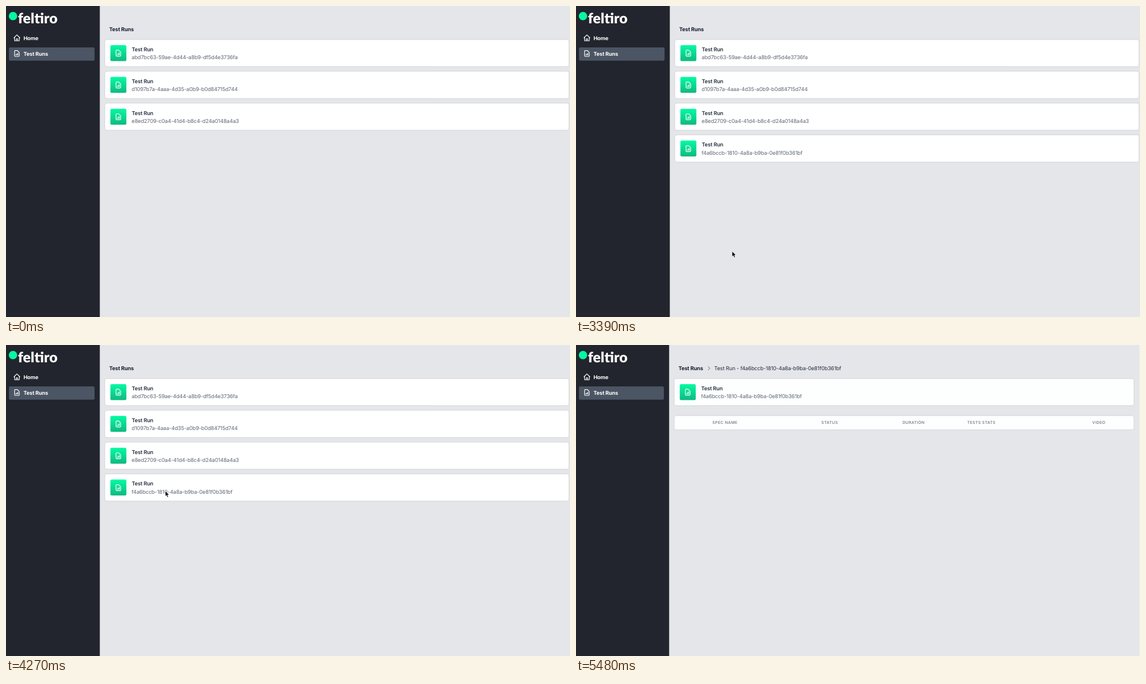
An HTML page that plays this animation: 1007 by 556 pixels, repeating every 8 s.

```html
<!DOCTYPE html>
<html lang="en">
<head>
<meta charset="utf-8">
<title>Test Runs</title>
<style>
  html, body { margin: 0; width: 100%; height: 100%; overflow: hidden; background: #e4e6ea; }
  svg { display: block; width: 100%; height: 100%; }
  text { font: 400 9.48px Inter, "Liberation Sans", sans-serif; letter-spacing: -.18px; fill: #252f3f; text-rendering: geometricPrecision; white-space: pre; }
  .heading { font-weight: 700; fill: #161e2e; }
  .title { font-weight: 600; }
  .id { fill: #5f6775; }
  .nav { font-weight: 700; fill: #fff; }
  .column { font-size: 7.1px; font-weight: 500; letter-spacing: .355px; fill: #6b7280; }
  .brand { font: 900 25.5px Lato, "Open Sans", sans-serif; letter-spacing: 0; fill: #fff; }
  .panel { filter: drop-shadow(0 .8px .9px rgba(0, 0, 0, .15)); }
  .line { fill: none; stroke: #fff; stroke-width: 2; stroke-linecap: round; stroke-linejoin: round; }
</style>
</head>
<body>
<svg id="stage" viewBox="0 0 1007 556" xmlns="http://www.w3.org/2000/svg">
  <defs>
    <linearGradient id="green" x1="0" y1="0" x2="0" y2="1">
      <stop offset="0" stop-color="#03fba3"/>
      <stop offset="1" stop-color="#10b981"/>
    </linearGradient>
  </defs>
</svg>
<script>
const LOOP = 8000;
const ROW_ADDED = 960, OPENED = 4450;
const UNIT = 0.593;
const PITCH = 56.9;
const IDS = [
  'abd7bc63-59ae-4d44-a8b9-df5d4e3736fa',
  'd1097b7a-4aaa-4d35-a0b9-b0d84715d744',
  'e8ed2709-c0a4-41d4-b8c4-d24a0148a4a3',
  'f4a6bccb-1810-4a8a-b9ba-0e81f0b361bf'
];
const ICONS = {
  report: 'M9 17v-2m3 2v-4m3 4v-6m2 10H7a2 2 0 01-2-2V5a2 2 0 012-2h5.586a1 1 0 01.707.293l5.414 5.414a1 1 0 01.293.707V19a2 2 0 01-2 2z',
  home: 'M3 12l2-2m0 0l7-7 7 7M5 10v10a1 1 0 001 1h3m10-11l2 2m-2-2v10a1 1 0 01-1 1h-3m-6 0a1 1 0 001-1v-4a1 1 0 011-1h2a1 1 0 011 1v4a1 1 0 001 1m-6 0h6',
  chevron: 'M9 5l7 7-7 7'
};
const stage = document.getElementById('stage');

function add(parent, tag, attrs, content) {
  const node = document.createElementNS('http://www.w3.org/2000/svg', tag);
  for (const key in attrs) node.setAttribute(key, attrs[key]);
  if (content) node.textContent = content;
  parent.appendChild(node);
  return node;
}

const group = parent => add(parent, 'g', {});
const label = (parent, style, x, y, content) => add(parent, 'text', { class: style, x, y }, content);
const box = (parent, x, y, width, height, rx, fill, style = '') =>
  add(parent, 'rect', { x, y, width, height, rx, fill, class: style });
const icon = (parent, name, cx, cy, scale = UNIT) =>
  add(parent, 'path', { class: 'line', d: ICONS[name], transform: `translate(${cx} ${cy}) scale(${scale}) translate(-12 -12)` });

function runCard(parent, x, y, right, id, fill) {
  const card = group(parent);
  box(card, x, y, right - x, 47.4, 3.5, fill, 'panel');
  box(card, x + 9.4, y + 9.5, 28.5, 28.5, 2.5, 'url(#green)');
  icon(card, 'report', x + 23.6, y + 23.9);
  label(card, 'title', x + 47.5, y + 20.3, 'Test Run');
  label(card, 'id', x + 47.3, y + 34.6, id);
  return card;
}

const sidebar = box(stage, 0, 0, 167.5, 556, 0, '#22252d');
const active = box(stage, 5.3, 74, 152.8, 23.7, 2.5, '#4b5563');
add(stage, 'circle', { cx: 12.5, cy: 18, r: 7.5, fill: '#05f8a2' });
label(stage, 'brand', 21.3, 31, 'feltiro');
icon(stage, 'home', 19.5, 56.9);
label(stage, 'nav', 31.2, 61, 'Home');
icon(stage, 'report', 19.5, 84.9);
label(stage, 'nav', 31.2, 89.4, 'Test Runs');

const list = group(stage);
label(list, 'heading', 184.2, 45, 'Test Runs');
const cards = IDS.map((id, i) => runCard(list, 177, 60.4 + i * PITCH, 1004.7, id, '#fff'));

const detail = group(stage);
label(detail, 'heading', 182.9, 45, 'Test Runs');
icon(detail, 'chevron', 237.3, 41.6, 0.42).style.stroke = '#374151';
label(detail, '', 246.8, 45, 'Test Run - ' + IDS[3]);
runCard(detail, 175.9, 60.4, 995.7, IDS[3], '#fcfffe');
box(detail, 175.9, 126.8, 819.8, 24.2, 3.5, '#fcfffe', 'panel');
[['SPEC NAME', 243.6], ['STATUS', 438], ['DURATION', 582.9], ['TESTS STATS', 698.4], ['VIDEO', 921.8]]
  .forEach(([name, x]) => label(detail, 'column', x, 141, name));
box(detail, 1006, 0, 1, 556, 0, '#f3f4f6');

const cursor = add(stage, 'path', {
  d: 'M0 0V9.6L2.2 7.6 3.8 11.2 5.5 10.4 4 7H7Z',
  fill: '#000', stroke: '#fff', 'stroke-width': 0.7, 'stroke-linejoin': 'round'
});

const show = (node, on) => node.setAttribute('visibility', on ? 'inherit' : 'hidden');
const mix = (a, b, p) => a.map((v, i) => v + (b[i] - v) * p);
const smooth = p => p * p * (3 - 2 * p);

// Pointer samples arrive at discrete intervals, as in a screen recording.
const stepped = (t, start, gap, first, count) =>
  Math.min(1, (Math.floor((t - start) / gap + 1e-6) + first) / count);

function cursorAt(t) {
  const entry = [274.4, 522], rest = [288.2, 258.4], nudge = [283, 261], press = [284.4, 261], exit = [753, 490];
  if (t < 3170 || t >= 5480) return null;
  if (t < 3920) return mix(entry, rest, smooth(stepped(t, 3170, 57.5, 0, 8)));
  if (t < 4270) return mix(rest, nudge, stepped(t, 3920, 60, 1, 3));
  if (t < 5050) return press;
  return mix(press, exit, stepped(t, 5050, 61.4, 1, 7) ** 1.6);
}

function render(t) {
  const opened = t >= OPENED;
  sidebar.setAttribute('width', opened ? 166.3 : 167.5);
  active.setAttribute('width', opened ? 151.6 : 152.8);
  show(list, !opened);
  show(detail, opened);
  show(cards[3], t >= ROW_ADDED);
  const tip = cursorAt(t);
  show(cursor, tip);
  if (tip) cursor.setAttribute('transform', `translate(${tip})`);
}

const began = performance.now();
function tick() {
  render((performance.now() - began) % LOOP);
  requestAnimationFrame(tick);
}
tick();
</script>
</body>
</html>
```
